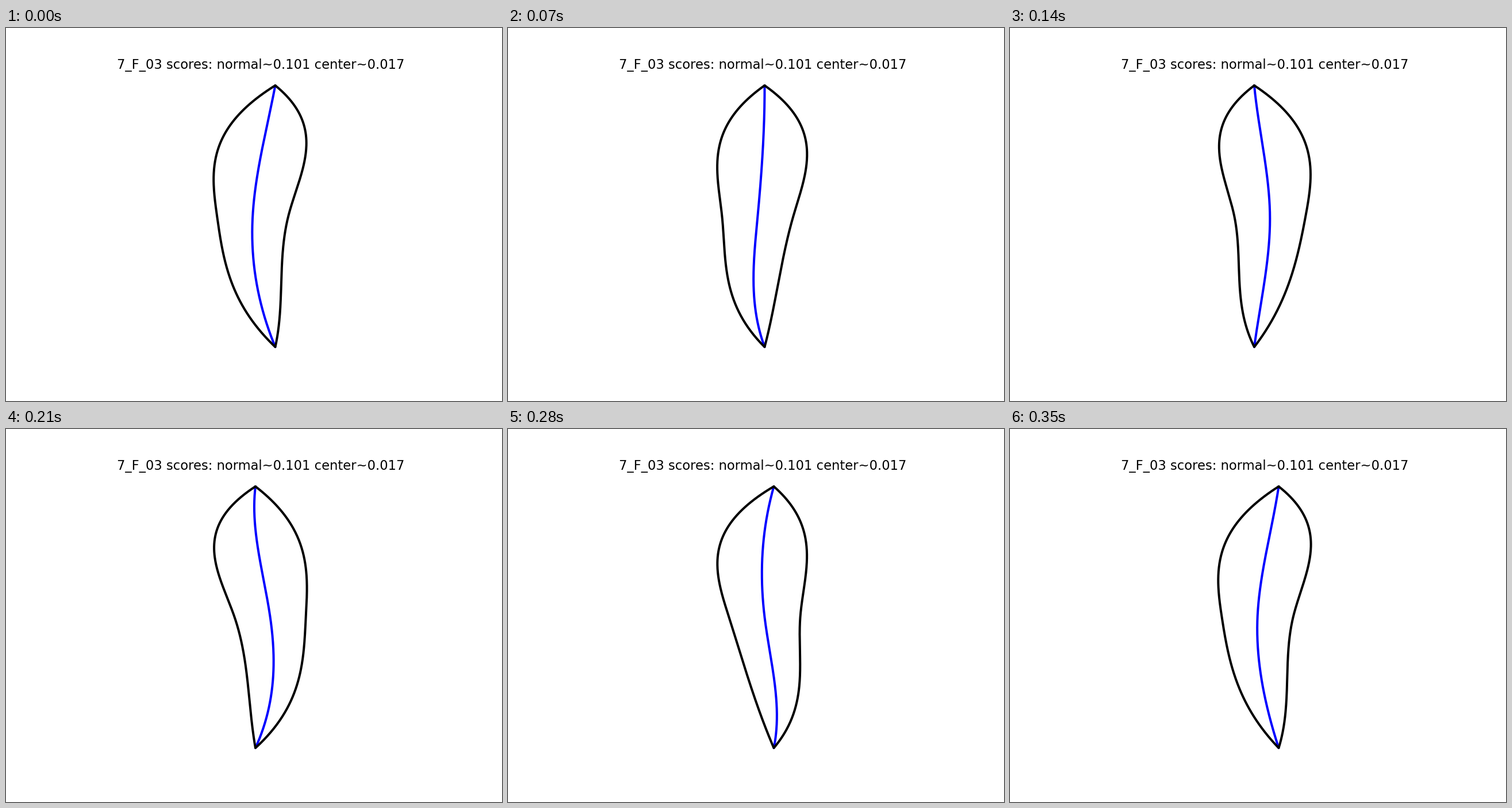
Animation of 863 by 649 pixels, one loop 420 ms. Source, as a matplotlib script:

```python
import numpy as np
import matplotlib.pyplot as plt
from matplotlib.animation import FuncAnimation

W, H, DPI = 863, 649, 128
PX = 72 / DPI  # points per pixel
TOP, BOTTOM = 100, 555

# Key points sit at equal steps down the body: tip, upper, middle, lower, tip.
HALF_WIDTH = 0, 77, 62, 43.5
POSES = [
    (468.5, 445, 429.2, 435.5),
    (446.5, 443.2, 434.4, 427.2),
    (425, 441, 452.3, 442.7),
    (434, 439.3, 459.7, 464),
    (462.5, 443, 446.5, 463.8),
    (467.5, 446, 430.6, 438.6),
]


def basis(t):
    """One cubic above the middle key point and one below, joined smoothly."""
    return np.column_stack([1 + 0 * t, t, t**2, t**3, np.clip(t - 2, 0, None) ** 3])


def curve(points):
    """Smooth curve through the key points, ending where it began."""
    return basis(step) @ np.linalg.solve(basis(np.arange(5.0)), [*points, points[0]])


step = np.linspace(0, 4, 201)
y = TOP + (BOTTOM - TOP) * step / 4
half = curve(HALF_WIDTH)

fig = plt.figure(figsize=(W / DPI, H / DPI), dpi=DPI, facecolor="white")
ax = fig.add_axes([0, 0, 1, 1])
ax.set(xlim=(0, W), ylim=(H, 0))
ax.axis("off")

ax.text(442.7, 71.5, "7_F_03 scores: normal~0.101 center~0.017", ha="center",
        va="baseline", family="DejaVu Sans", size=22.6 * PX, color="black")
stroke = dict(lw=4 * PX, solid_joinstyle="round", solid_capstyle="round")
spine_line, = ax.plot([], [], color="blue", **stroke)
outline, = ax.plot([], [], color="black", **stroke)


def draw(i):
    spine = curve(POSES[i])
    spine_line.set_data(spine, y)
    outline.set_data(np.r_[spine - half, (spine + half)[::-1]], np.r_[y, y[::-1]])
    return spine_line, outline


anim = FuncAnimation(fig, draw, frames=len(POSES), interval=70,
                     repeat=True, repeat_delay=0)
plt.show()
```
